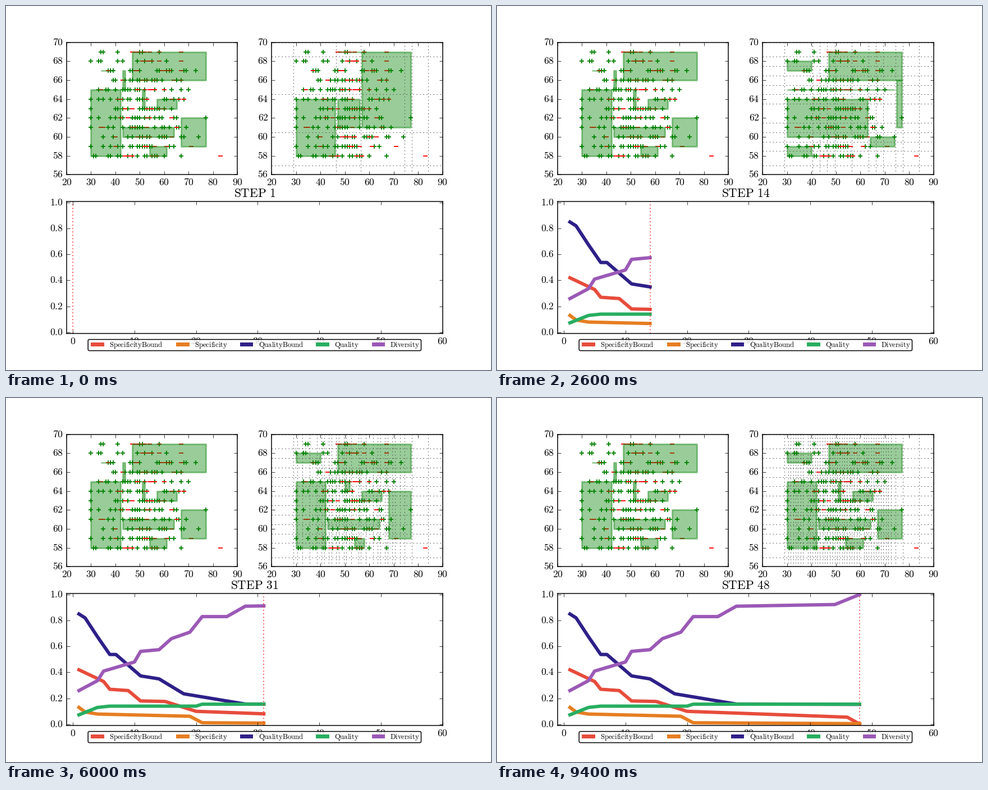
These frames come from a looping animation (864 px wide and 648 px high, 9600 ms). A matplotlib script:

```python
import numpy as np
import matplotlib.pyplot as plt
from matplotlib.animation import FuncAnimation
from matplotlib.collections import LineCollection, PolyCollection
from matplotlib.patches import FancyBboxPatch, Rectangle
from matplotlib.ticker import FormatStrFormatter, MultipleLocator

STEPS = 48
W, H, DPI = 864, 648, 108

plt.rcParams.update({
    "mathtext.fontset": "cm",
    "axes.linewidth": 1.0,
    "axes.axisbelow": False,
    "lines.scale_dashes": False,
    "xtick.direction": "in", "ytick.direction": "in",
    "xtick.top": True, "ytick.right": True,
    "xtick.major.size": 4, "ytick.major.size": 4,
    "xtick.major.width": 0.5, "ytick.major.width": 0.5,
    "xtick.major.pad": 3.2, "ytick.major.pad": 4,
    "xtick.labelsize": 11.75, "ytick.labelsize": 11.75,
    "ytick.alignment": "center",
})

# Boxes are x0, x1, y0, y1; flat ones show as a line
TOP = (47, 77, 66, 69)
WEST = (30, 42, 58, 65)
SHELF = (30, 40, 67, 68)
BLOCK = (57, 65, 63, 64)
BAR = (43, 64, 60, 61)
FOOT = (54, 61, 58, 59)
CORNER = (67, 77, 59, 62)
SLIT = (51, 52, 63, 65)
DASH = (46, 54, 62, 62)
EAST = (68, 77, 59, 64)
CENTRE = (30, 63, 60, 64)
BASE = (30, 40, 58, 59)
LEFT_BOXES = [TOP, WEST, BLOCK, BAR, FOOT, CORNER, SLIT, DASH,
              (43, 44, 65, 67), (34, 39, 67, 67)]
# Boxes on the right, by the step from which they hold
STAGES = {
    1: [(57, 77, 61, 69), (47, 57, 69, 69), (30, 46, 58, 64), (47, 56, 61, 64)],
    5: [TOP, SHELF, CENTRE, BASE, (30, 74, 65, 65), (75, 77, 61, 66),
        (64, 74, 59, 60)],
    16: [TOP, SHELF, CENTRE, BASE, EAST, (30, 41, 65, 65)],
    21: [TOP, SHELF, WEST, EAST, BLOCK, BAR, DASH, (50, 52, 64, 65),
         (54, 58, 58, 59)],
    47: [TOP, SHELF, WEST, CORNER, BLOCK, BAR, DASH, SLIT, FOOT],
}

# Cuts: outer bounds and first splits, then one more per step
X_START = [29, 46.5, 56.5, 74.5, 77.5, 84]
Y_START = [57, 60.5, 64.5, 68.5, 70]
X_MORE = [x for x in (10 + 23 * np.arange(43)) % 43 + 30.5
          if x not in X_START]
Y_MORE = sorted((y for y in np.arange(58.5, 68) if y not in Y_START),
                key=lambda y: abs(abs(y - 62.5) - 3.5))

# name, colour, legend x, key points (step, value)
CURVES = [
    ("SpecificityBound", "#e74c3c", 151,
     [(1, .42), (5, .33), (6, .27), (9, .26), (11, .18), (15, .176),
      (20, .1), (46, .055), (48, .002)]),
    ("Specificity", "#e67e22", 303,
     [(1, .13), (2, .095), (4, .079), (19, .062), (21, .012), (48, .005)]),
    ("QualityBound", "#2e2088", 416.5,
     [(1, .85), (2, .82), (4, .675), (6, .538), (7, .538), (11, .373),
      (14, .35), (18, .235), (28, .156), (48, .154)]),
    ("Quality", "#27ae60", 552,
     [(1, .073), (4, .13), (6, .14), (20, .14), (21, .155), (48, .155)]),
    ("Diversity", "#9b59b6", 651.5,
     [(1, .26), (4, .336), (5, .41), (10, .48), (11, .562), (14, .575),
      (16, .66), (19, .71), (21, .83), (25, .83), (28, .91), (44, .923),
      (48, 1)]),
]


def roman(text):
    return r"$\mathrm{%s}$" % text.replace(" ", r"\ ")


def scatter_rows(rng, mean, spread, low, high, count):
    """Whole ages around a mean, one row per year."""
    points = []
    for year in range(58, 70):
        ages = rng.normal(mean, spread, count(year)).round()
        points += [(age, year) for age in np.unique(ages.clip(low, high))]
    return points


def set_axes(ax, xlim, ylim, y_step, y_format):
    ax.set_xlim(xlim)
    ax.set_ylim(ylim)
    ax.xaxis.set_major_locator(MultipleLocator(10))
    ax.yaxis.set_major_locator(MultipleLocator(y_step))
    ax.xaxis.set_major_formatter(FormatStrFormatter(roman("%d")))
    ax.yaxis.set_major_formatter(FormatStrFormatter(roman(y_format)))


def corners(boxes):
    return [[(a, c), (b, c), (b, d), (a, d)] for a, b, c, d in boxes]


def add_map(pos):
    ax = fig.add_subplot(2, 2, pos)
    for points, marker, color in ((alive, "+", "green"), (dead, "_", "red")):
        ax.scatter(*zip(*points), s=25, marker=marker, c=color, linewidths=1.2)
    boxes = PolyCollection(corners(LEFT_BOXES), facecolor="green",
                           edgecolor="green", alpha=0.4, linewidths=2)
    ax.add_collection(boxes)
    set_axes(ax, (20, 90), (56, 70), 2, "%d")
    return ax, boxes


def add_legend():
    ax = fig.add_axes([0, 0, 1, 1], zorder=5)
    ax.set_xlim(0, W)
    ax.set_ylim(H, 0)
    ax.axis("off")
    style = "round,pad=0,rounding_size=2.4"
    for face, edge, alpha in (("white", "none", 0.85), ("none", "black", 1)):
        ax.add_patch(FancyBboxPatch((146.2, 593.6), 593.3, 20, boxstyle=style,
                                    fc=face, ec=edge, lw=1, alpha=alpha))
    for name, color, x, _ in CURVES:
        ax.add_patch(Rectangle((x, 599.2), 23.5, 6.4, fc=color, ec="none"))
        ax.text(x + 33, 606.5, roman(name), fontsize=8.5, va="baseline")


rng = np.random.default_rng(7)
alive = scatter_rows(rng, 52, 11, 30, 77, lambda y: min(21, 6 + 6 * (69 - y)))
dead = scatter_rows(rng, 53, 9, 34, 78, lambda y: 7) + [(83, 58)]

fig = plt.figure(figsize=(W / DPI, H / DPI), dpi=DPI, facecolor="white")
fig.subplots_adjust(left=0.125, right=0.9, bottom=0.1, top=0.9,
                    wspace=0.2, hspace=0.2)
add_map(1)
right, right_boxes = add_map(2)
grid = LineCollection([], colors="0.3", linewidths=0.7,
                      linestyles=[(0, (1, 3))])
right.add_collection(grid, autolim=False)

chart = fig.add_subplot(2, 1, 2)
set_axes(chart, (-1, 60), (-0.01, 1.01), 0.2, "%.1f")
title = chart.set_title("", fontsize=14.4, pad=5)
steps = np.arange(1, STEPS + 1)
values = [np.interp(steps, *zip(*keys)) for *_, keys in CURVES]
lines = [chart.plot([], [], color=color, lw=4, solid_joinstyle="round")[0]
         for _, color, _, _ in CURVES]
cursor = chart.axvline(0, color="red", lw=1, ls=(0, (1, 3)))
add_legend()


def update(i):
    step = i + 1
    title.set_text(roman(f"STEP {step}"))
    # The first step has no curve yet and its cursor rests at zero
    shown = step if i else 0
    cursor.set_xdata([shown, shown])
    for line, v in zip(lines, values):
        line.set_data(steps[:shown], v[:shown])

    stage = max(s for s in STAGES if s <= step)
    right_boxes.set_verts(corners(STAGES[stage]))

    # Cuts alternate between y and x until y is used up
    n_y = min(len(Y_MORE), (i + 1) // 2)
    xs = X_START + X_MORE[:i - n_y]
    ys = Y_START + Y_MORE[:n_y]
    grid.set_segments([[(x, 56), (x, 70)] for x in xs]
                      + [[(20, y), (90, y)] for y in ys])
    return []


anim = FuncAnimation(fig, update, frames=STEPS, interval=200, repeat=True,
                     repeat_delay=0, init_func=lambda: [], blit=False,
                     cache_frame_data=False)
plt.show()
```
